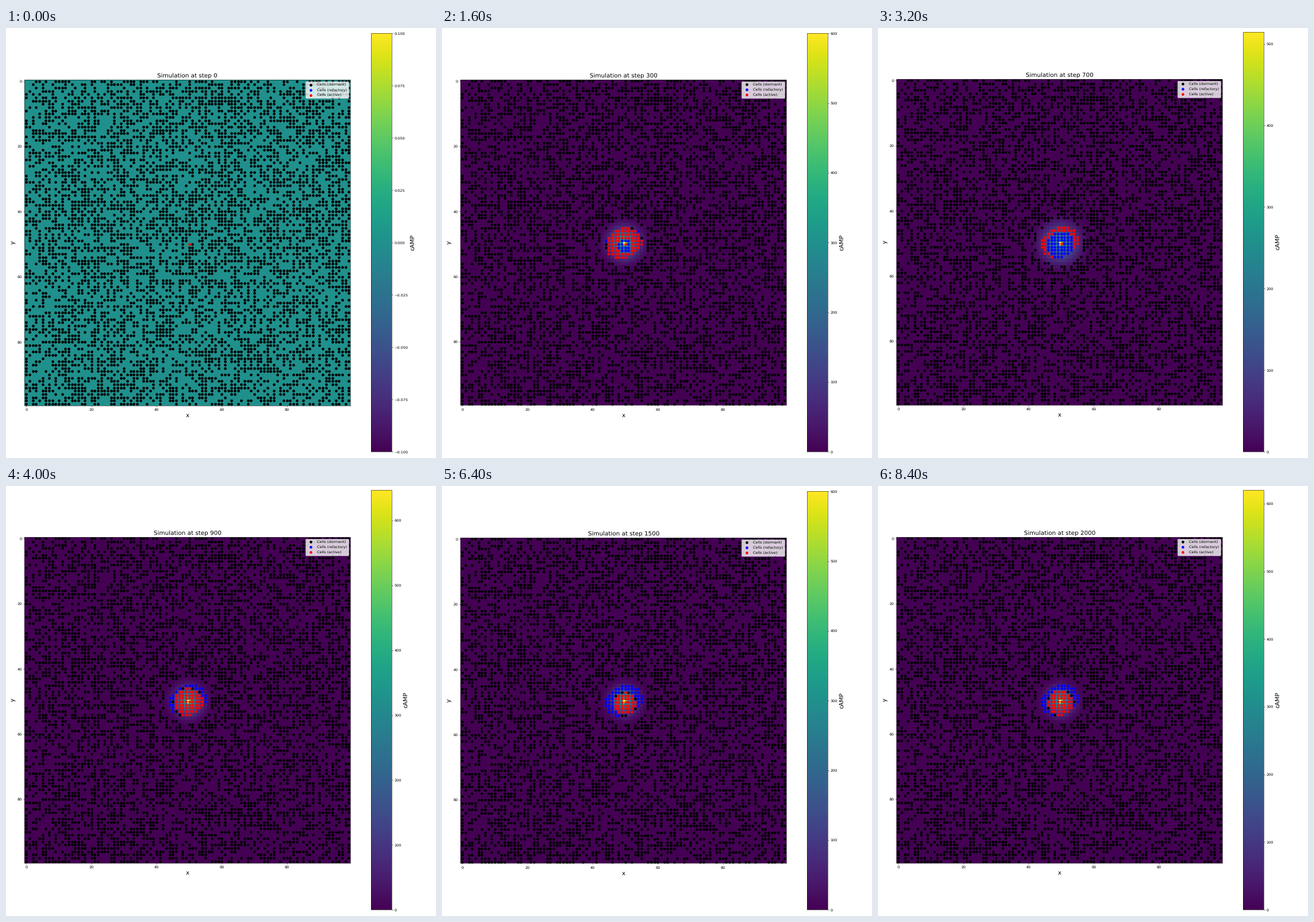
A matplotlib script for the animation above (8800 ms loop, 748 by 748 pixels).

```python
import numpy as np
import matplotlib.pyplot as plt
from matplotlib.animation import FuncAnimation

plt.rcParams.update({"font.family": "DejaVu Sans", "text.hinting": "no_hinting"})

N = 100
FRAMES, INTERVAL = 22, 400
DPI, LAYOUT_DPI = 46.75, 100
PERIOD = 5.3                    # pulse period, in sampled frames
ACTIVE, REFRACTORY = 2.25, 5.1  # ages at which these states end
SOURCE = np.array([50, 50])

# Peak concentration over one pulse: quick rise, slow decay
PULSE = [(0, 480), (1, 600.5), (1.7, 647), (2.4, 600.5), (3.4, 526), (4, 503), (PERIOD, 480)]

YY, XX = np.mgrid[:N, :N]


def by_distance(points, centre):
    d = np.hypot(*(points - centre).T)
    return points[np.argsort(d, kind="stable")]


def positions(mask, centre):
    return by_distance(np.column_stack([XX[mask], YY[mask]]), centre)


# Cells fill the grid at random; the nearest ones gather in a sheared oval
occupied = np.random.default_rng(7).random((N, N)) < 0.5
occupied[tuple(SOURCE)] = True
CELLS = positions(occupied, (49.6, 49.6))

dy = YY - 49.5
dx = XX - 49.5 + 0.25 * dy
SLOTS = positions(np.abs(dx / 5.9) ** 1.7 + np.abs(dy / 5.1) ** 1.7 < 1, SOURCE)


def phase(k):
    return (17 - k) % PERIOD


def field(k):
    c = np.zeros((N, N))
    peak = 187.5 if k == 1 else 0
    if k > 1:
        p = phase(k)
        peak = np.interp(p, *zip(*PULSE))
        width = 3 - 0.5 * np.cos(2 * np.pi * (p - 1.2) / PERIOD)
        r2 = (XX - 49.8) ** 2 + (YY - 49.8) ** 2
        c = (peak - 300) * np.exp(-r2 / (2 * width ** 2))
    c[tuple(SOURCE)] = peak
    return c, peak


def cells(k):
    """Positions of dormant, refractory and active cells."""
    moved = int(len(SLOTS) * np.clip((k - 1) * 0.65, 0, 1))
    pos = CELLS.copy()
    pos[:moved] = SLOTS[:moved]
    state = np.zeros(len(pos), int)

    # The wave starts in the middle and travels outwards
    d = np.hypot(*(pos[:moved] - (49.8, 50.4)).T)
    start = np.maximum(1 + 0.65 * (d - 3.45), 0.1)
    age = (phase(k) - start) % PERIOD
    state[:moved] = np.where(age < ACTIVE, 2, age < REFRACTORY)
    state[(pos == SOURCE).all(axis=1)] = 2
    return [pos[state == s] for s in range(3)]


fig = plt.figure(figsize=(16, 16), dpi=DPI)


def draw(k):
    fig.clear()
    ax = fig.add_subplot()
    c, peak = field(k)
    low, high = (0, peak) if peak else (-0.1, 0.1)
    im = ax.imshow(c, cmap="viridis", vmin=low, vmax=high)
    fig.colorbar(im, ax=ax).set_label("cAMP", fontsize=16)

    names = ("dormant", "refactory", "active")
    for pts, name, color in zip(cells(k), names, ("black", "blue", "red")):
        ax.scatter(*pts.T, color=color, label=f"Cells ({name})")

    step = k if k < 2 else 100 * (k - 1)
    ax.set_title(f"Simulation at step {step}", fontsize=16)
    ax.set_xlabel("x", fontsize=16)
    ax.set_ylabel("y", fontsize=16)
    ax.set_xlim(-0.5, N - 0.5)
    ax.set_ylim(N - 0.5, -0.5)
    ax.legend(loc="upper right")

    # Text is measured more finely at a higher resolution
    fig.set_dpi(LAYOUT_DPI)
    fig.tight_layout()
    fig.set_dpi(DPI)
    return []


anim = FuncAnimation(fig, draw, frames=FRAMES, init_func=lambda: draw(0),
                     interval=INTERVAL, repeat=True, repeat_delay=0, blit=False)
plt.show()
```
